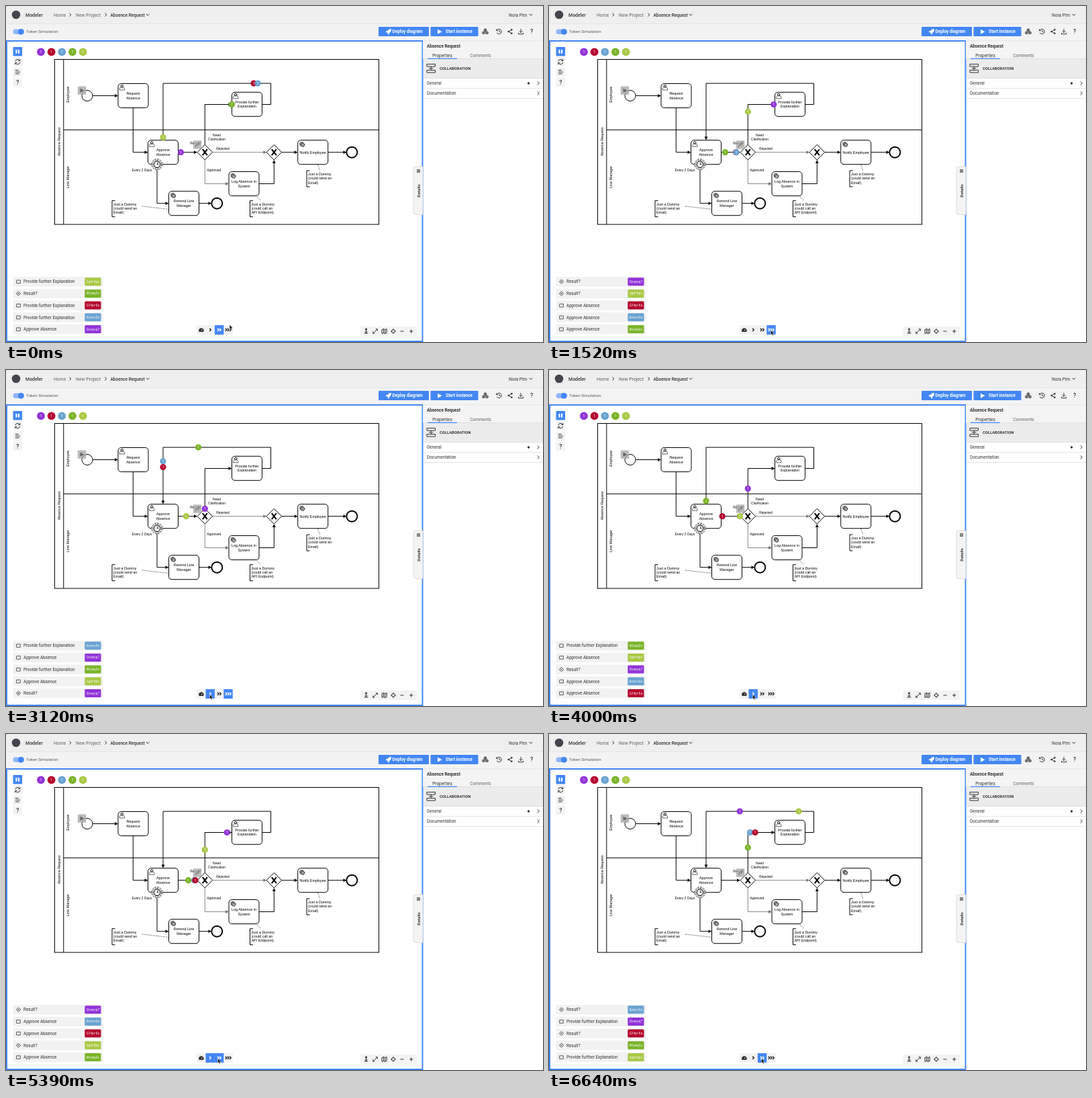
Write an HTML page that moves like this. It is 800 px wide and 500 px high and loops after 6670 ms.

```html
<!DOCTYPE html>
<html lang="en">
<head>
<meta charset="utf-8">
<title>Token simulation</title>
<style>
  html, body { margin: 0; width: 100%; height: 100%; overflow: hidden; background: #fff; }
  svg { display: block; width: 800px; height: 500px; }
  text { font-family: Roboto, "Open Sans", sans-serif; fill: #333; }
  .bpmn text { font-family: "Liberation Sans", Arial, sans-serif; fill: #000; }
  .mono { font-family: "Liberation Mono", "DejaVu Sans Mono", monospace; fill: #fff; }
  .line { fill: none; stroke: #000; stroke-width: 1; }
  .soft { stroke: #888; }
  .icon { fill: none; stroke: #333; stroke-width: 1; }
  .solid { fill: #333; stroke: none; }
</style>
</head>
<body>
<svg id="stage" viewBox="0 0 800 500" xmlns="http://www.w3.org/2000/svg"></svg>
<script>
const LOOP = 6670;
const BLUE = '#4387f4';
const stage = document.getElementById('stage');

// ---------- markup helpers ----------
const rect = (x, y, w, h, fill, extra = '') =>
  `<rect x="${x}" y="${y}" width="${w}" height="${h}" fill="${fill}" ${extra}/>`;
const circle = (x, y, r, extra = 'class="icon"') => `<circle cx="${x}" cy="${y}" r="${r}" ${extra}/>`;
const path = (d, extra = 'class="icon"') => `<path d="${d}" ${extra}/>`;
const text = (x, y, size, str, extra = '') => `<text x="${x}" y="${y}" font-size="${size}" ${extra}>${str}</text>`;
const mid = 'text-anchor="middle"';
const bold = 'font-weight="700"';
const medium = 'font-weight="500"';
const turned = (x, y, size, str, extra = '') =>
  text(0, 0, size, str, `${mid} ${extra} transform="translate(${x} ${y}) rotate(-90)"`);
const lines = (x, y, size, gap, rows, extra = '') =>
  rows.map((row, i) => text(x, y + i * gap, size, row, extra)).join('');

// ---------- page chrome ----------
function header() {
  return rect(0, 0, 800, 52, '#f3f3f3') + rect(0, 0, 800, 26, '#efefef') + rect(0, 26, 800, .7, '#dedede') +
    circle(15, 13, 6.3, 'fill="#45454d"') +
    text(29, 15.6, 7, 'Modeler', medium) +
    text(71, 15.6, 6.8, 'Home', 'fill-opacity=".75"') + path('M94.5 10.5l2.3 2.5l-2.3 2.5') +
    text(104, 15.6, 6.85, 'New Project', 'fill-opacity=".75"') + path('M147.5 10.5l2.3 2.5l-2.3 2.5') +
    text(155.5, 15.6, 6.55, 'Absence Request', medium) + path('M208.8 11.8l2.4 2.4l2.4-2.4') +
    text(749, 15.6, 6.6, 'Nora Pim') + path('M779.5 11.8l2.3 2.4l2.3-2.4') +
    rect(10.5, 34.5, 16.5, 7.6, '#8fb6f8', 'rx="3.8"') + circle(22.3, 38.3, 4.4, `fill="${BLUE}"`) +
    text(30, 40.4, 6.2, 'Token Simulation', 'fill-opacity=".8"') +
    rect(555, 31, 75, 14, BLUE, 'rx="1"') + rect(632.5, 31, 71, 14, BLUE, 'rx="1"') +
    path('M574 34q-4 0-5.5 3l-2 .3l-1 1.6l2 .3l1.6 1.6l.3 2l1.6-1l.3-2q3-1.500 2.700-5.800ZM567.500 41l-1.500 1.500', 'fill="#fff"') +
    text(575.500, 40.200, 6.450, 'Deploy diagram', `${bold} style="fill:#fff"`) +
    path('M643 34.700l6.500 3.500l-6.500 3.500Z', 'fill="#fff"') +
    text(655, 40.200, 6.350, 'Start instance', `${bold} style="fill:#fff"`) +
    circle(714, 35.800, 1.900) + circle(711.500, 39.800, 1.900) + circle(716.500, 39.800, 1.900) +
    circle(714, 35.800, 1, 'class="solid"') + circle(711.500, 39.800, 1, 'class="solid"') + circle(716.500, 39.800, 1, 'class="solid"') +
    path('M731.200 36.200a3.700 3.700 0 1 1 0 3.600M730.500 34.500v2.200h2.300M734.800 35.800v2.400l1.700 1') +
    path('M753.300 35.300l-4.600 2.700l4.600 2.800') +
    [[753.300, 35.200], [748.700, 38], [753.300, 40.800]].map(p => circle(...p, 1.300, 'class="solid"')).join('') +
    path('M767 34v5.200M764.700 37.300l2.300 2.300l2.300-2.300M763.500 39.800v2h7v-2') +
    text(783, 41, 8.500, '?', `${mid} ${medium}`);
}

function sidePanel() {
  return rect(621, 51, 179, 28, '#f4f4f4') + rect(621, 51.500, 179, .6, '#dedede') +
    text(627, 61.800, 6.350, 'Absence Request', bold) +
    text(650, 75.700, 6.400, 'Properties', mid) + text(707, 75.700, 6.400, 'Comments', `${mid} fill-opacity=".75"`) +
    rect(622, 79, 178, 28.500, '#ececec') + rect(622, 78.300, 178, .7, '#dcdcdc') + rect(628, 77.700, 44, 1.300, BLUE) +
    path('M627 86.500h12.500v3.500h-12.500ZM627 95.500h12.500v3.500h-12.500ZM633.200 90v5.500M630 92.700h6.400') +
    text(646, 94.900, 5.800, 'COLLABORATION', bold) +
    [[115, 'General'], [130, 'Documentation']].map(([y, label]) =>
      text(627, y + 2.300, 6.400, label) + path(`M791.700 ${y - 2.600}l2.600 2.600l-2.600 2.600`) +
      rect(622, y + 7.300, 178, .7, '#d8d8d8')).join('') +
    rect(622, 107.200, 178, .7, '#d8d8d8') + circle(778.500, 115, 1.700, 'class="solid"');
}

function detailsTab() {
  return path('M621 239h-11q-3 0-3 3v65.500q0 3 3 3h11Z', 'fill="#f4f4f4" stroke="#d2d2d2" stroke-width=".7"') +
    path('M612 243.700h5M612 245.500h5M612 247.300h5') + turned(616.800, 275, 6.200, 'Details', bold);
}

function tools() {
  const boxes = [61, 76.200, 91.400, 106.600].map((y, i) => rect(10.500, y, 13.600, 13.600, i ? '#f3f3f3' : BLUE, 'rx=".8"')).join('');
  return boxes + rect(14.400, 65, 2.100, 5.600, '#fff') + rect(18, 65, 2.100, 5.600, '#fff') +
    path('M13.900 82.300a3.500 3.500 0 0 1 6.600-1M20.800 79v2.600h-2.600M20.700 83.800a3.500 3.500 0 0 1-6.600 1M13.800 87v-2.600h2.600', 'class="icon" stroke-width="1.200"') +
    path('M13.800 95.500h5M13.800 98.200h7.200M13.800 100.900h6', 'class="icon" stroke-width="1.200"') +
    text(17.300, 116.600, 8.500, '?', `${mid} ${medium}`) +
    rect(527.500, 477, 84.500, 14, '#f3f3f3', 'rx="1"') +
    path('M536.500 480.500v5.500M534.500 484.300l2 2l2-2M533.600 487h5.800') + circle(536.500, 481, 1.200) +
    path('M547 486.800l6-5.600M550.800 480.800h2.600v2.600M549.300 487.200h-2.600v-2.600') +
    path('M560 481.500l2.400-1l2.400 1l2.400-1v6l-2.400 1l-2.400-1l-2.400 1ZM562.400 480.500v6M564.800 481.500v6', 'class="icon" stroke-width=".7"') +
    circle(577, 484, 2.500) + path('M577 480.200v2M577 485.800v2M573.200 484h2M578.800 484h2') +
    path('M587.500 484h5') + path('M601 484h5.400M603.700 481.300v5.400');
}

// ---------- diagram ----------
const head = (x, y, dir, color = '#000') =>
  `<path d="M0 0l-5-2.400v4.800Z" fill="${color}" transform="translate(${x} ${y}) rotate(${dir})"/>`;
const flow = (d, x, y, dir = 0, soft) =>
  path(d, `class="line${soft ? ' soft' : ''}"`) + head(x, y, dir, soft ? '#777' : '#000');

const person = (x, y) => circle(x, y - 1.800, 1.700, 'class="line" stroke-width=".7"') +
  path(`M${x - 3.700} ${y + 4}v-2q.5-1.900 2.300-2.200h2.800q1.800.3 2.300 2.200v2Z`, 'class="line" style="stroke-width:.6"');
const gear = (x, y) => [[0, 0], [1.500, 1.500]].map(([dx, dy]) =>
  circle(x + dx, y + dy, 2.600, 'fill="#fff" stroke="#222" stroke-width="1.500" stroke-dasharray="1.250 .8"') +
  circle(x + dx, y + dy, 2, 'fill="#fff" stroke="#222" stroke-width=".6"') +
  circle(x + dx, y + dy, .8, 'fill="none" stroke="#222" stroke-width=".5"')).join('');

function task(x, y, rows, mark) {
  return rect(x, y, 45, 36, '#fff', 'rx="4.500" stroke="#000"') + mark(x + 5.800, y + 5.500) +
    lines(x + 22.500, y + 16.700 + (rows.length === 1 ? 3.200 : 0), 5.400, 6.300, rows, mid);
}
const gateway = (x, y) => path(`M${x} ${y - 11.300}l11.300 11.300l-11.300 11.300l-11.300-11.300Z`, 'fill="#fff" stroke="#000"') +
  path(`M${x - 3.500} ${y - 4.500}l7 9M${x + 3.500} ${y - 4.500}l-7 9`, 'stroke="#000" stroke-width="2.100"');
const endEvent = (x, y) => circle(x, y, 8, 'fill="#fff" stroke="#000" stroke-width="1.900"');
const note = (x, y, rows) => path(`M${x + 4.500} ${y}h-4.500v24h4.500`, 'class="line"') + lines(x + 2, y + 7, 5.400, 6.300, rows);
const dots = d => path(d, 'class="line" stroke-dasharray=".9 1.700"');

function timer(x, y) {
  let ticks = '';
  for (let i = 0; i < 12; i++) ticks += `<path d="M0 -4.600v1" stroke="#000" stroke-width=".5" transform="translate(${x} ${y}) rotate(${i * 30})"/>`;
  return circle(x, y, 8, 'fill="#fff" stroke="#000" stroke-width=".8" stroke-dasharray="2.700 1.500"') +
    circle(x, y, 6.500, 'fill="none" stroke="#000" stroke-width=".7" stroke-dasharray="2.400 1.300"') +
    circle(x, y, 4.900, 'class="line" stroke-width=".9"') + ticks + path(`M${x + 1.400} ${y - 3.400}l-1.400 3.400h2.600`, 'class="line" style="stroke-width:.8"');
}

function diagram() {
  const small = 4.950;
  return '<g class="bpmn">' +
    rect(72.500, 79.500, 483, 245.500, '#fff', 'stroke="#000"') + path('M85.800 79.500v245.500M85.800 184.300h469.700', 'class="line"') +
    turned(81, 202, 5.400, 'Absence Request') + turned(94.200, 131.800, 5.400, 'Employee') + turned(94.200, 254.500, 5.400, 'Line Manager') +
    flow('M129 133.500h34', 167, 133.500) + flow('M189.300 151.500v66.200h18', 211.500, 217.700) +
    flow('M256.500 217.700h25', 285, 217.700) + flow('M296.300 206.500v-60h36', 336.500, 146.500) +
    flow('M381.500 146.500h13v-31.400h-160.500v80', 234, 199.500, 90) +
    flow('M307.500 217.700h77', 388.300, 217.700, 0, true) + flow('M296.300 229v35.500h32', 332, 264.500, 0, true) +
    flow('M377 264.500h22.300v-32', 399.300, 229, -90) + flow('M410.500 217.700h20', 434.700, 217.700) +
    flow('M479.700 217.700h24', 507.500, 217.700) + flow('M225 243.500v50.200h14', 242.500, 293.700) + flow('M287.500 293.700h15', 306.500, 293.700) +
    circle(121, 133.500, 8, 'fill="#fff" stroke="#000"') +
    task(167, 115.500, ['Request', 'Absence'], person) + task(211.500, 199.700, ['Approve', 'Absence'], person) +
    task(336.500, 128.300, ['Provide further', 'Explanation'], person) + task(434.700, 199.700, ['Notify Employee'], gear) +
    task(332, 246.500, ['Log Absence in', 'System'], gear) + task(242.500, 275.700, ['Remind Line', 'Manager'], gear) +
    gateway(296.300, 217.700) + gateway(399.300, 217.700) + endEvent(515.300, 217.700) + endEvent(314.300, 293.700) + timer(225, 235.700) +
    text(202.500, 246.200, small, 'Every 2 Days', mid) + text(323, 214.300, small, 'Rejected', mid) +
    text(309.700, 246.200, small, 'Approved', mid) + text(282.500, 206.200, small, 'Result?', mid) +
    lines(314, 194, small, 6, ['Need', 'Clarification'], mid) +
    note(158, 289.700, ['Just a Dummy', '(could send an', 'Email)']) + note(363.500, 289.700, ['Just a Dummy', '(could call an', 'API Endpoint)']) +
    note(448, 245, ['Just a Dummy', '(could send an', 'Email)']) +
    dots('M203 298l39.500 4.500') + dots('M372.500 282.500l7 7') + dots('M464.500 236l3 8.500') +
    rect(106.800, 119.500, 12.400, 12.400, '#aaa', 'fill-opacity=".8"') + path('M110.500 122.500l5.800 3.200l-5.800 3.200Z', 'fill="#666"') +
    rect(278.800, 200.300, 12.400, 12.400, '#aaa', 'fill-opacity=".8"') +
    path('M283 210.300v-3.300h4v-3M285.600 205l1.400-1.600l1.400 1.600', 'fill="none" stroke="#666" stroke-width=".9"') + '</g>';
}

// ---------- simulation ----------
const edges = {
  A: { name: 'Approve Absence', pts: [[256.500, 217.700], [285, 217.700]] },
  B: { name: 'Result?', pts: [[296.300, 206.500], [296.300, 146.500], [336.500, 146.500]] },
  C: { name: 'Provide further Explanation', pts: [[381.500, 146.500], [394.500, 146.500], [394.500, 115.100], [234, 115.100], [234, 199.500]] }
};
// each trip: edge, start, duration on the simulation clock
const tokens = [
  { id: '1kaeyq7', color: '#9234d8', trips: [['A', -271, 1121], ['B', 850, 1495], ['C', 2345, 1850], ['A', 4195, 1200], ['B', 5395, 1565], ['C', 7045, 1685]] },
  { id: '124pr6a', color: '#b5072e', trips: [['C', -440, 1827], ['A', 1387, 1233], ['B', 2620, 1393], ['C', 4013, 1833], ['A', 5846, 1101], ['B', 7073, 1306]] },
  { id: '0zexv3a', color: '#6aa3d2', trips: [['C', -409, 1858], ['A', 1449, 1121], ['B', 2570, 1564], ['C', 4134, 1721], ['A', 5840, 1190], ['B', 7030, 1478]] },
  { id: '06xmq3x', color: '#7ab428', trips: [['B', -1496, 1520], ['C', 24, 1850], ['A', 1874, 1184], ['B', 3058, 1620], ['C', 4678, 1432], ['A', 6110, 1169], ['B', 7279, 1473]] },
  { id: '1gdr0pv', color: '#a9c945', trips: [['C', -1743, 1850], ['A', 130, 1210], ['B', 1340, 1684], ['C', 3024, 1850], ['A', 4874, 1250], ['B', 6082, 1474], ['C', 7556, 1688]] }
];
const events = tokens.flatMap(token => token.trips.map(([edge, at]) => ({ token, edge, at }))).sort((a, b) => a.at - b.at);

// from time, rate, active speed button
const speeds = [[0, 1, 1], [810, 2, 2], [3220, .5, 0], [5430, 1, 1]];
const pointer = [[0, 333, 474.300], [250, 331.500, 480], [500, 330.500, 482.500], [2200, 330.500, 482.500], [2300, 315.500, 482],
  [2550, 303.500, 483], [4450, 303.500, 483], [4650, 315.500, 483], [5400, 315.500, 483], [5700, 316.500, 483]];

function simClock(t) {
  return speeds.reduce((sum, [from, rate], i) => {
    const to = i + 1 < speeds.length ? speeds[i + 1][0] : LOOP;
    return sum + rate * Math.max(0, Math.min(t, to) - from);
  }, 0);
}

function ease(i, count, p) {
  if (count === 1) return .5 - Math.cos(p * Math.PI) / 2;
  if (i === 0) return 1 - Math.cos(p * Math.PI / 2);
  return i === count - 1 ? Math.sin(p * Math.PI / 2) : p;
}

function along({ pts }, p) {
  const lens = pts.slice(1).map(([x, y], i) => Math.hypot(x - pts[i][0], y - pts[i][1]));
  let rest = p * lens.reduce((a, b) => a + b), i = 0;
  while (i < lens.length - 1 && rest > lens[i]) rest -= lens[i++];
  const k = ease(i, lens.length, Math.min(1, rest / lens[i]));
  return [0, 1].map(c => pts[i][c] + (pts[i + 1][c] - pts[i][c]) * k);
}

function pointerAt(t) {
  const i = pointer.findIndex(key => key[0] > t);
  if (i === 0) return pointer[0].slice(1);
  if (i < 0) return pointer[pointer.length - 1].slice(1);
  const a = pointer[i - 1], b = pointer[i], k = (t - a[0]) / (b[0] - a[0]);
  return [1, 2].map(c => a[c] + (b[c] - a[c]) * k);
}

const dot = (x, y, r, color, size) => circle(x, y, r, `fill="${color}"`) + text(x, y + size * .36, size, '1', `${mid} style="fill:#fff"`);
const counters = () => tokens.map((token, i) => dot(52 + i * 15.650, 68.300, 5.900, token.color, 5.800)).join('');
const tokenDots = () => '<g id="dots">' + tokens.map(token => `<g>${dot(0, 0, 4.600, token.color, 5.400)}</g>`).join('') + '</g>';

function logRows() {
  let out = '';
  for (let i = 0; i < 5; i++) {
    const y = 410.200 + i * 17.700;
    out += '<g class="row">' + rect(10.500, y - 7.200, 134, 14.400, '#f2f2f2', 'rx=".8"') + path('', 'class="icon" style="stroke-width:.8" transform="translate(18.500 ' + y + ')"') +
      text(26, y + 2.200, 6.350, '') + rect(117.300, y - 6, 24.200, 12, '#000', 'rx="1.500"') + text(129.400, y + 1.500, 4.700, '', `${mid} class="mono"`) + '</g>';
  }
  return out;
}

function speedBar() {
  return rect(284, 475, 54, 14, '#f2f2f2', 'rx="1"') +
    path('M287.800 485a3.700 3.700 0 1 1 6.200 0Z', 'class="solid"') + path('M291 483.500l1.500-2.300', 'stroke="#fff" stroke-width=".8"') +
    [0, 1, 2].map(i => {
      const x = 297.500 + i * 13.400, c = x + 6.700;
      let d = '';
      for (let k = 0; k <= i; k++) d += `M${c - 1 + (k - i / 2) * 3.200} ${479.700}l2 2.100l-2 2.100`;
      return `<g class="speed">${rect(x, 475, 13.400, 14, BLUE)}${path(d, 'fill="none" stroke-width="1.400"')}</g>`;
    }).join('');
}

stage.innerHTML = header() + rect(1, 52, 619.500, 447, '#fff', `stroke="${BLUE}" stroke-width="2"`) + sidePanel() + detailsTab() +
  tools() + counters() + diagram() + tokenDots() + logRows() + speedBar() +
  path('M0 0v7l1.600-1.500l1.100 2.500l1.200-.5l-1.100-2.400h2.300Z', 'id="cursor" fill="#111" stroke="#fff" stroke-width=".5"');

const layer = document.getElementById('dots');
const dotNodes = [...layer.children];
const rowNodes = [...document.querySelectorAll('.row')];
const speedNodes = [...document.querySelectorAll('.speed')];
const cursor = document.getElementById('cursor');
const boxIcon = 'M-2.800 -2.200h5.600v4.600h-5.600Z';
const forkIcon = 'M0 -3.200l3.200 3.200l-3.200 3.200l-3.200-3.200ZM-1 -1l2 2M1 -1l-2 2';

function drawTokens(v) {
  tokens.map((token, i) => {
    const [edge, start, length] = token.trips.filter(trip => trip[1] <= v).pop();
    const [x, y] = along(edges[edge], Math.min(1, (v - start) / length));
    dotNodes[i].setAttribute('transform', `translate(${x} ${y})`);
    return { node: dotNodes[i], start };
  }).sort((a, b) => a.start - b.start).forEach(item => layer.appendChild(item.node));
}

function drawLog(v) {
  events.filter(event => event.at <= v).slice(-5).forEach(({ token, edge }, i) => {
    const [, icon, label, badge, id] = rowNodes[i].children;
    icon.setAttribute('d', edge === 'B' ? forkIcon : boxIcon);
    label.textContent = edges[edge].name;
    badge.setAttribute('fill', token.color);
    id.textContent = token.id;
  });
}

function drawSpeed(t) {
  const active = speeds.filter(s => s[0] <= t).pop()[2];
  const [hx, hy] = pointerAt(t - 90);
  const hover = hy > 475 ? Math.floor((hx - 297.500) / 13.400) : -1;
  speedNodes.forEach((node, i) => {
    const lit = i === active || i === hover;
    node.children[0].setAttribute('fill-opacity', lit ? 1 : 0);
    node.children[1].setAttribute('stroke', lit ? '#fff' : '#222');
  });
  cursor.setAttribute('transform', `translate(${pointerAt(t).join(' ')})`);
}

const begin = performance.now();
function frame() {
  const t = (performance.now() - begin) % LOOP;
  const v = simClock(t);
  drawTokens(v);
  drawLog(v);
  drawSpeed(t);
  requestAnimationFrame(frame);
}
frame();
</script>
</body>
</html>
```
